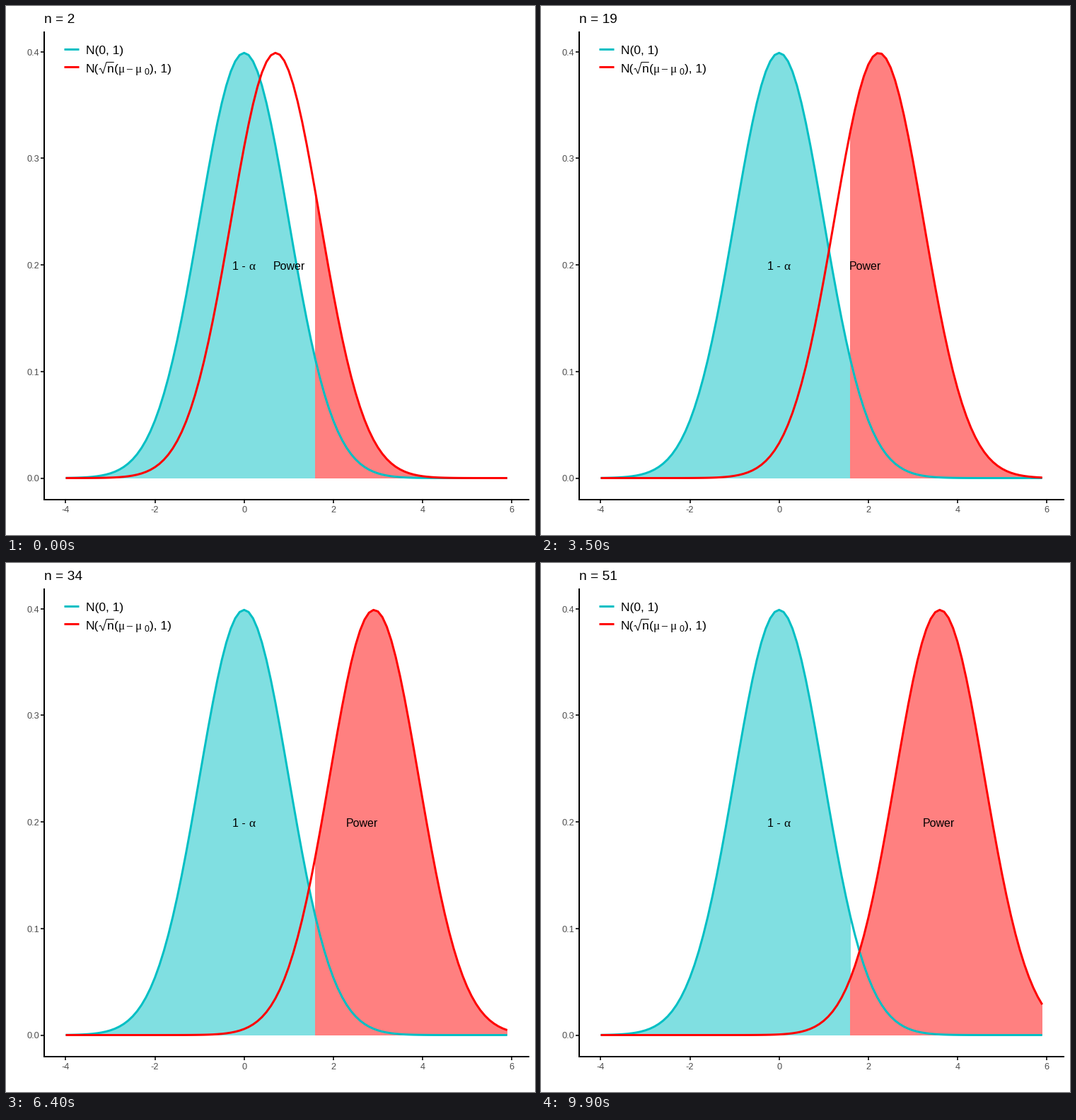
A matplotlib script for the animation above (10 s loop, 748x748 px).

```python
import numpy as np
import matplotlib.pyplot as plt
from matplotlib.animation import FuncAnimation

SIZE, DPI = 748, 64
PX = 72 / DPI                      # points per pixel
TEAL, RED = "#00BFC4", "#FF0000"
TEAL_FILL, RED_FILL = "#80DFE1", "#FF8080"
SANS, SERIF = "Liberation Sans", "Liberation Serif"
CUT = 1.6                          # critical value
BODY, SMALL, NOTE, TITLE = 17.33, 12.7, 15.95, 19.07

fig = plt.figure(figsize=(SIZE / DPI, SIZE / DPI), dpi=DPI, facecolor="white")
ax = fig.add_axes([0, 0, 1, 1])
ax.set_xlim(0, SIZE)
ax.set_ylim(SIZE, 0)
ax.axis("off")


def sx(x):
    return 336.7 + 63.05 * np.asarray(x)


def sy(y):
    return 667.5 - 1507 * np.asarray(y)


def density(x, mean=0.0):
    return np.exp(-(x - mean) ** 2 / 2) / np.sqrt(2 * np.pi)


def line(xs, ys, color, width, z=3):
    return ax.plot(xs, ys, color=color, lw=width * PX, zorder=z,
                   solid_capstyle="butt", solid_joinstyle="round")[0]


def text(x, y, s, size, color="black", font=SANS, ha="left"):
    return ax.text(x, y, s, fontsize=size * PX, color=color, family=font,
                   ha=ha, va="baseline", zorder=6)


def area(x, mean):
    """Closed outline of the region under the density."""
    xs = np.r_[x[0], x, x[-1]]
    ys = np.r_[0, density(x, mean), 0]
    return np.column_stack([sx(xs), sy(ys)])


def draw_axes():
    line([54, 54], [36, 699], "black", 2)
    line([53, 740], [698, 698], "black", 2)
    for v in range(-4, 7, 2):
        x = float(sx(v))
        line([x, x], [699, 702.5], "#333333", 2, 2)
        text(x, 716, str(v), SMALL, "#4D4D4D", ha="center")
    for k in range(5):
        y = float(sy(k / 10))
        line([49.5, 53], [y, y], "#333333", 2, 2)
        text(47, y + 4.8, f"{k / 10:.1f}", SMALL, "#4D4D4D", ha="right")


def draw_legend():
    line([82, 103], [61, 61], TEAL, 3)
    line([82, 103], [86, 86], RED, 3)
    text(113, 68, "N(0, 1)", BODY)
    base = 94
    text(113, base, "N(", BODY)
    line([131.5, 133.7, 137, 142, 152.7], [89.5, 88.2, 95.5, 79.5, 79.5],
         "black", 1)
    text(143, base, "n", BODY)
    text(153, base, "(", BODY)
    text(158.8, base, "\u03bc", BODY, font=SERIF)
    text(169, base, "\u2212", BODY, font=SERIF)
    text(186 - 3.5, base, "\u03bc", BODY, font=SERIF)
    text(196, base + 3, "0", BODY * 0.7)
    text(203, base, "), 1)", BODY)


draw_axes()
draw_legend()

grid = np.arange(-40, 60) / 10
left = grid[grid <= CUT + 1e-9]
right = grid[grid >= CUT - 1e-9]

ax.add_patch(plt.Polygon(area(left, 0), fc=TEAL_FILL, ec="none",
                         antialiased=False, zorder=1))
power_area = ax.add_patch(plt.Polygon(area(right, 0), fc=RED_FILL, ec="none",
                                      antialiased=False, zorder=1))
line(sx(grid), sy(density(grid)), TEAL, 3, 4)
alt_curve = line(sx(grid), sy(density(grid)), RED, 3, 5)

text(320.3, 372.5, "1 - ", NOTE)
text(343.3, 372.5, "\u03b1", NOTE * 1.08, font=SERIF)
power = text(0, 372.5, "Power", NOTE, ha="center")
title = text(54, 24, "", TITLE)


def update(i):
    # The curve steps to the next n one tick before the title does.
    n = 2 + (i + 1) // 2
    mean = np.sqrt(n) / 2
    alt_curve.set_ydata(sy(density(grid, mean)))
    power_area.set_xy(area(right, mean))
    power.set_x(float(sx(1 + 0.0514 * (n - 2))) + 0.4)
    title.set_text(f"n = {2 + i // 2}")
    return alt_curve, power_area, power, title


anim = FuncAnimation(fig, update, frames=100, interval=100, repeat=True,
                     repeat_delay=0, blit=False)
plt.show()
```
